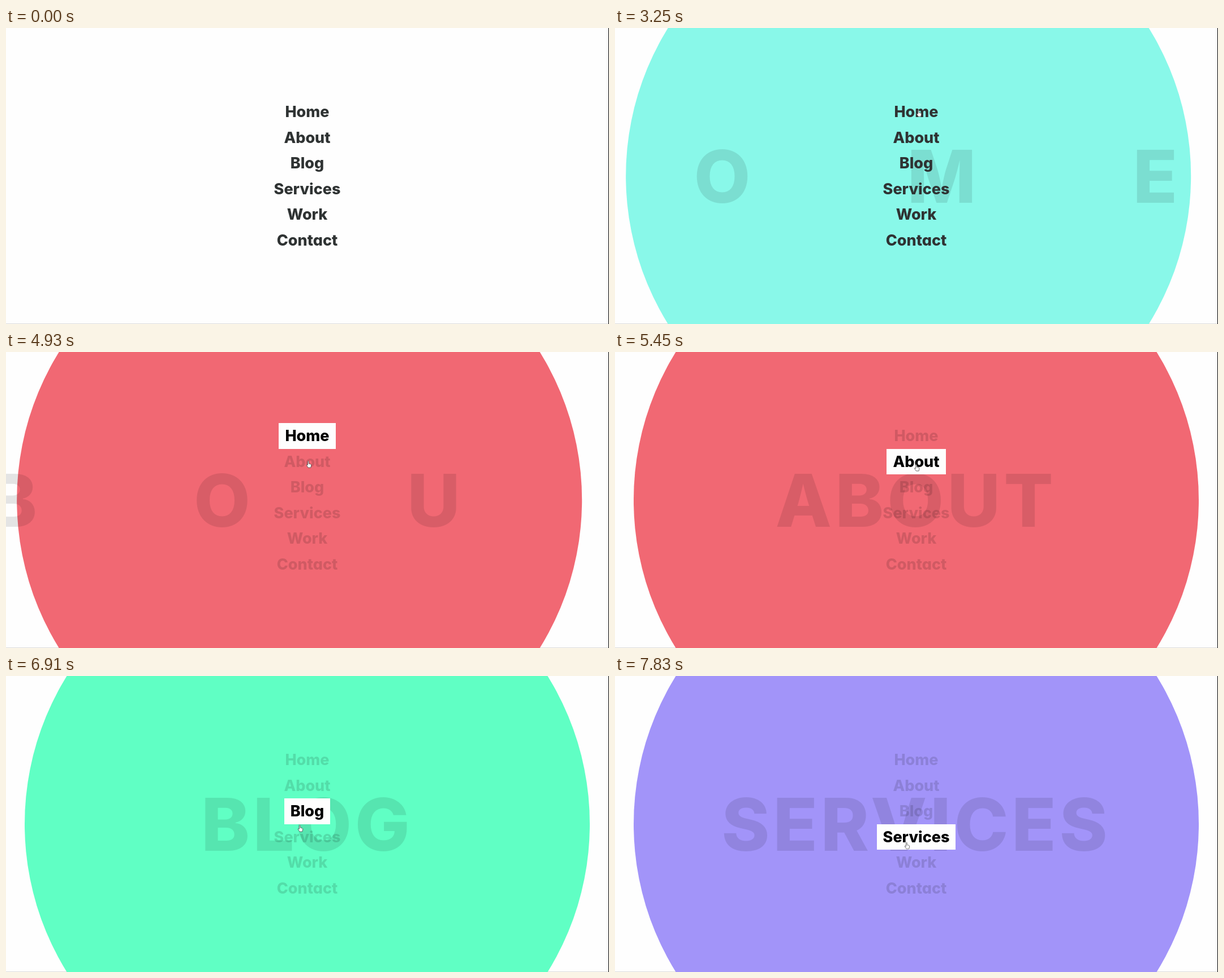
An HTML page that plays this animation: 1066x525 px, repeating every 8000 ms.

```html
<!DOCTYPE html>
<html lang="en">
<head>
<meta charset="utf-8">
<title>Menu hover</title>
<style>
  html, body { margin: 0; width: 100%; height: 100%; overflow: hidden; background: #fefefe; }
  body { position: relative; font-family: Inter, "Open Sans", sans-serif; font-weight: 800; white-space: nowrap; }
  .floor, .edge, .disc, .menu, .cursor { position: absolute; }
  .floor { left: 0; bottom: 0; width: 1065px; height: 1px; background: #dcdcdc; }
  .edge { right: 0; top: 0; width: 1px; height: 525px; background: #000; }
  .disc {
    left: 33px; top: -236.8px; width: 998.6px; height: 998.6px; border-radius: 50%;
    display: flex; align-items: center; justify-content: center;
    font-size: 129.3px; text-transform: uppercase; color: rgba(0, 0, 0, .1); opacity: 0;
  }
  .menu { left: 0; top: 126px; width: 1065px; display: flex; flex-direction: column; align-items: center; }
  .menu span { padding: 0 11px; font-size: 27px; line-height: 45.5px; font-feature-settings: "cv11"; }
  .cursor { left: 0; top: 0; overflow: visible; fill: #fff; stroke-linejoin: round; }
</style>
</head>
<body>
<div class="floor"></div>
<div id="discs"></div>
<div class="menu" id="menu"></div>
<svg class="cursor" id="cursor" width="10" height="14">
  <path id="arrow" stroke="#777" stroke-width=".8" d="M0 0V9L2.1 7.2 3.7 10.6 5.2 9.9 3.7 6.7H6.4Z"/>
  <path id="hand" stroke="#333" stroke-width=".7" d="M2.5 1.2Q3.5 0 4.3 1.2V5L7.8 6Q9 6.5 8.7 8L7.8 12H3.2L.4 8Q-.2 6.5 1.2 6.8L2.5 7.6Z"/>
</svg>
<div class="edge"></div>
<script>
const LOOP = 8000, FADE = 500, STEP = 156;
const ITEMS = ['Home', 'About', 'Blog', 'Services', 'Work', 'Contact'];

// the pointer visits the items from the top: start time, disc colour
const HOVERS = [[3250, '#89f8e9'], [4930, '#f16873'], [5940, '#60ffc4'], [7200, '#a294f9']];

// pointer path: time, x, y
const PATH = [[100, 913, 88], [1620, 911, 78], [1770, 859.5, 73], [2220, 720, 43], [2810, 541, 90], [3250, 533, 145],
  [4790, 532, 158], [4930, 531, 193], [5800, 528, 203], [5940, 518, 233.5], [6910, 516, 264], [7830, 512, 294.5]];

const $ = id => document.getElementById(id);
const key = (time, props, easing = 'linear') => ({ offset: time / LOOP, easing, ...props });

function add(parent, tag, text) {
  const el = parent.appendChild(document.createElement(tag));
  el.textContent = text;
  return el;
}

function animate(el, keys) {
  const anim = el.animate(keys, { duration: LOOP, fill: 'both' });
  anim.pause();
  return anim;
}

function discKeys([start], i) {
  const end = i + 1 < HOVERS.length ? HOVERS[i + 1][0] : LOOP;
  const wide = { opacity: 1, letterSpacing: '277px', transform: 'translateX(-13.8px)' };
  const tight = { opacity: 1, letterSpacing: '5.5px', transform: 'translateX(0px)' };
  return [
    key(0, { ...wide, opacity: 0 }, 'step-end'),
    key(start, wide, 'ease'),
    key(start + FADE, tight, 'step-end'),
    key(end, { ...tight, opacity: 0 }),
    key(LOOP, { ...tight, opacity: 0 }),
  ];
}

function look(item, active) {
  const on = item === active;
  return {
    color: active < 0 ? '#2f3333' : on ? '#000' : 'rgba(0, 0, 0, .133)',
    backgroundColor: `rgba(254, 254, 254, ${+on})`,
  };
}

function itemKeys(item) {
  const changes = HOVERS.flatMap(([start], active) => [
    key(start, look(item, active - 1), 'ease'),
    key(start + FADE, look(item, active), 'step-end'),
  ]);
  return [key(0, look(item, -1)), ...changes, key(LOOP, look(item, HOVERS.length - 1))];
}

function pathKeys() {
  const place = (x, y) => ({ transform: `translate(${x}px, ${y}px)` });
  const [, x, y] = PATH[PATH.length - 1];
  return [key(0, place(-20, 0), 'step-end'), ...PATH.map(([t, x, y]) => key(t, place(x, y))), key(LOOP, place(x, y))];
}

const parts = ITEMS.map((label, i) => animate(add($('menu'), 'span', label), itemKeys(i)));
HOVERS.forEach((hover, i) => {
  const disc = add($('discs'), 'div', ITEMS[i]);
  disc.className = 'disc';
  disc.style.background = hover[1];
  parts.push(animate(disc, discKeys(hover, i)));
});
const pointer = animate($('cursor'), pathKeys());

function draw(time) {
  // hover changes are shown in coarse steps
  const origin = HOVERS.reduce((last, [start]) => start <= time ? start : last, 0);
  const stepped = origin + Math.floor((time - origin) / STEP) * STEP;
  for (const part of parts) part.currentTime = stepped;
  pointer.currentTime = time;
  $('arrow').style.display = origin ? 'none' : '';
  $('hand').style.display = origin ? '' : 'none';
}

const start = performance.now();
function frame() {
  draw((performance.now() - start) % LOOP);
  requestAnimationFrame(frame);
}
frame();
</script>
</body>
</html>
```
